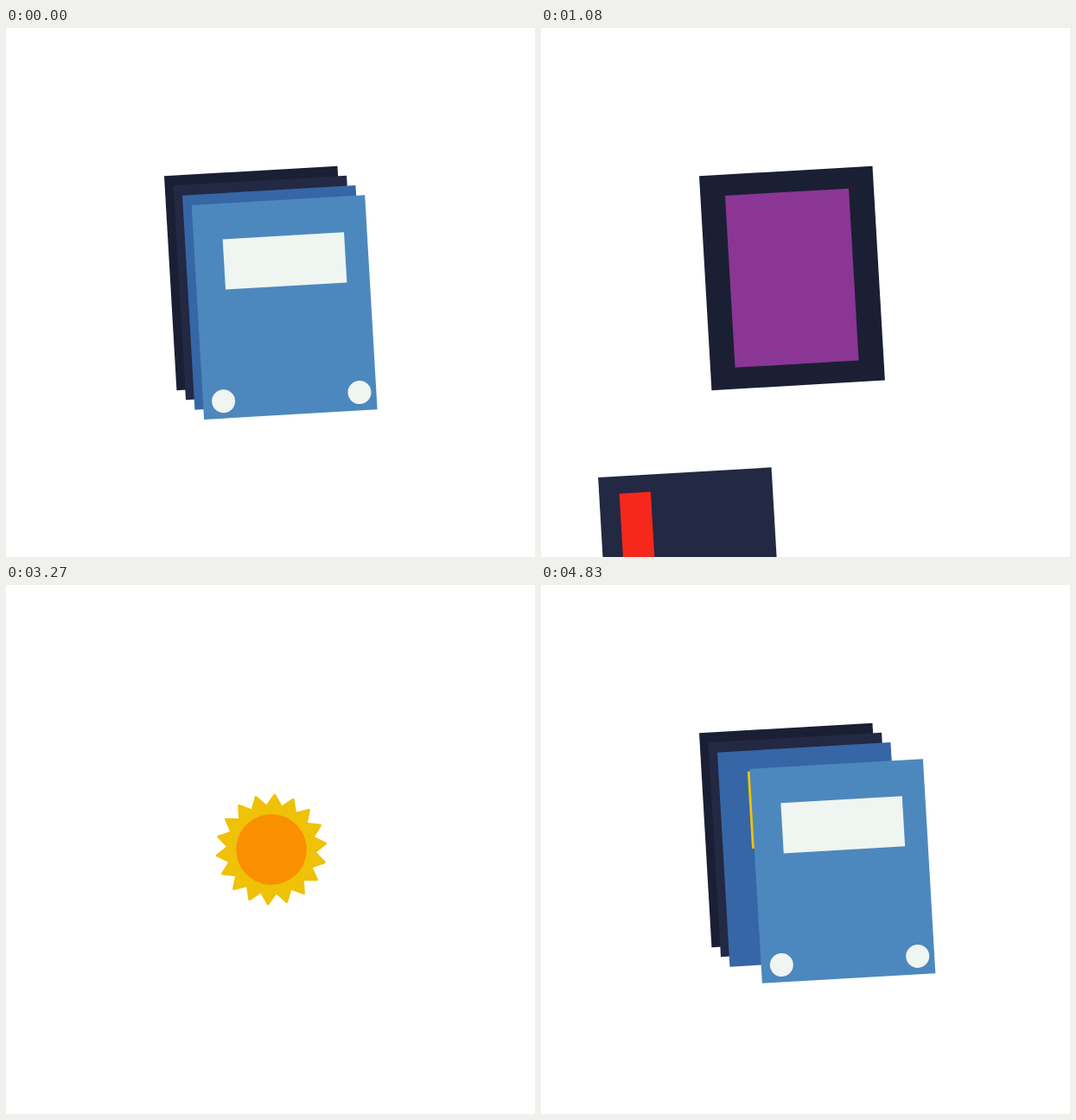
Recreate the animation shown at these times as an HTML page. Size 612 by 612 pixels, loop 4.86 s.

```html
<!DOCTYPE html>
<html lang="en">
<head>
<meta charset="utf-8">
<title>Cards and sun</title>
<style>
  html, body { margin: 0; width: 100%; height: 100%; overflow: hidden; background: #fff; }
  svg { display: block; width: 100vw; height: 100vh; }
</style>
</head>
<body>
<svg id="stage" viewBox="0 0 612 612"></svg>
<script>
const LOOP = 4860, STEP = 30, TILT = -3.33;
const SPIN_START = 1620, SPIN_TIME = 1620;
const stage = document.getElementById('stage');

function add(parent, tag, attrs) {
  const el = document.createElementNS('http://www.w3.org/2000/svg', tag);
  for (const k in attrs) el.setAttribute(k, attrs[k]);
  parent.appendChild(el);
  return el;
}

const rect = (x, y, width, height, fill) => ['rect', { x, y, width, height, fill }];
const dot = (cx, cy, r, fill) => ['circle', { cx, cy, r, fill }];

// x, y: resting corner; dx, dy: travel per step; start: ms at which it leaves
const cards = [
  { x: 183, y: 171.3, dx: 30, dy: -28, start: 1170, fill: '#1b1f34',
    parts: [rect(28.6, 24.4, 143.3, 199.2, '#8b3694')] },
  { x: 193.6, y: 182.3, dx: -12.75, dy: 33.77, start: 780, fill: '#232843',
    parts: [rect(23.4, 20.1, 36.3, 76.5, '#f6271b'), rect(71.6, 113.5, 99.4, 92.4, '#ec6200')] },
  { x: 204, y: 193.7, dx: -25.5, dy: 3.58, start: 300, fill: '#3666a5',
    parts: [rect(33.5, 24, 140.6, 89.5, '#f0c305')] },
  { x: 214.7, y: 205, dx: 26.74, dy: 7.82, start: 0, fill: '#4c88be',
    parts: [rect(33.6, 41.5, 140.6, 58.2, '#eff5f1'),
            dot(23.7, 228.5, 13.5, '#eff5f1'), dot(181.4, 227.5, 13.5, '#eff5f1')] }
];

function sunPoints(count, outer, inner) {
  return Array.from({ length: count * 2 }, (_, i) => {
    const a = i * Math.PI / count, r = i % 2 ? inner : outer;
    return (r * Math.sin(a)).toFixed(2) + ',' + (-r * Math.cos(a)).toFixed(2);
  }).join(' ');
}

const sun = add(stage, 'g', {});
add(sun, 'polygon', {
  points: sunPoints(18, 63, 50), fill: '#efc107',
  stroke: '#efc107', 'stroke-width': 3, 'stroke-linejoin': 'round'
});
add(sun, 'circle', { r: 40.8, fill: '#fa8f00' });

for (const c of cards) {
  c.el = add(stage, 'g', {});
  for (const [tag, attrs] of [rect(0, 0, 200.8, 248.4, c.fill), ...c.parts]) add(c.el, tag, attrs);
}

function draw(now) {
  // small offset guards against rounding at step edges
  const t = Math.floor((now + 0.5) / STEP) * STEP % LOOP;
  const away = Math.min(t, LOOP - t);
  for (const c of cards) {
    const n = Math.max(0, away - c.start) / STEP;
    c.el.setAttribute('transform',
      `translate(${c.x + c.dx * n} ${c.y + c.dy * n}) rotate(${TILT})`);
  }
  const turn = Math.min(1, Math.max(0, (t - SPIN_START) / SPIN_TIME));
  sun.setAttribute('transform', `translate(307 306) rotate(${3.6 + 360 * turn})`);
}

function tick() {
  draw(performance.now());
  requestAnimationFrame(tick);
}
draw(0);
requestAnimationFrame(tick);
</script>
</body>
</html>
```
